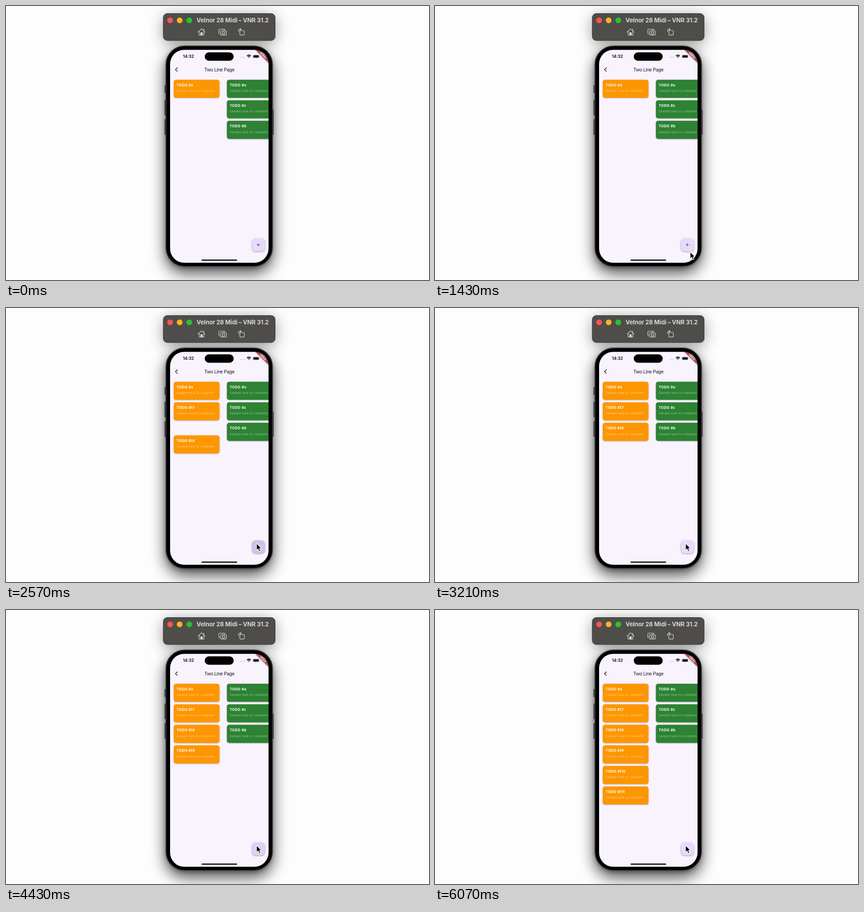
Write an HTML page that moves like this. It is 928x603 px and loops after 6.14 s.

```html
<!DOCTYPE html>
<html lang="en">
<head>
<meta charset="utf-8">
<title>Two Line Page</title>
<style>
html, body { margin: 0; width: 100%; height: 100%; overflow: hidden; background: #fdfdfd; }
svg { display: block; width: 928px; height: 603px; font-family: Inter, sans-serif; }
.wide { filter: blur(17px); opacity: .68; }
.tight { filter: blur(5px); opacity: .26; }
.raised { filter: drop-shadow(0 1px 1px rgba(0, 0, 0, .28)); }
.fab { filter: drop-shadow(0 1.5px 1.8px rgba(0, 0, 0, .38)); }
.line { fill: none; stroke: #dededc; stroke-width: 1.15; stroke-linejoin: round; stroke-linecap: round; }
.name { font-size: 7.7px; font-weight: 700; letter-spacing: .4px; fill: #fff; }
.note { font-size: 6.6px; letter-spacing: .3px; fill: #fff; fill-opacity: .52; }
</style>
</head>
<body>
<svg viewBox="0 0 928 603">
  <defs>
    <clipPath id="screen"><rect x="360" y="96.5" width="216" height="468.5" rx="31"/></clipPath>
  </defs>

  <!-- window shadows -->
  <rect class="wide" x="350" y="101" width="235" height="487" rx="42"/>
  <rect class="tight" x="350" y="90" width="235" height="487" rx="42"/>
  <rect class="wide" x="347" y="24" width="242" height="58" rx="9" style="opacity:.45"/>

  <!-- toolbar -->
  <rect x="345" y="16.5" width="245.5" height="59.5" rx="9" fill="#4e4d4a" stroke="#353533"/>
  <circle cx="360" cy="31.5" r="6.3" fill="#ff5450"/>
  <circle cx="381" cy="31.5" r="6.3" fill="#fdb124"/>
  <circle cx="402" cy="31.5" r="6.3" fill="#28c231"/>
  <text x="418" y="36" font-size="13" font-weight="700" letter-spacing="-.15" fill="#d6d6d4">Velnor 28 Midi – VNR 31.2</text>
  <g class="line">
    <path d="M421.5 57.5 429 50.2 436.5 57.5M423.7 56V64H434.3V56M433.7 54.2V50.8"/>
    <path d="M427.2 64V58.5H430.8V64Z" fill="#dededc"/>
    <path d="M468.8 61H468.4Q467 61 467 59.6V52.4Q467 51 468.4 51H479Q480.4 51 480.4 52.4"/>
    <path d="M472 54.7H474.2L475.4 53.2H479.2L480.4 54.7H482.2Q483.5 54.7 483.5 56V62.6Q483.5 63.9 482.2 63.9H472Q470.7 63.9 470.7 62.6V56Q470.7 54.7 472 54.7Z"/>
    <circle cx="477.2" cy="59.1" r="2.8"/>
    <rect x="513" y="54" width="9.8" height="9.8" rx="1.4"/>
    <path d="M510.3 56.5V53.8Q510.3 51.4 512.7 51.4H515.6M513.9 49.4 516 51.4 513.9 53.4"/>
  </g>

  <!-- phone -->
  <g fill="#38383d">
    <rect x="347.8" y="174" width="4" height="17.5" rx="1"/>
    <rect x="347.8" y="206" width="4" height="34.5" rx="1"/>
    <rect x="347.8" y="249" width="4" height="34.5" rx="1"/>
    <rect x="583.5" y="228" width="3.6" height="55.5" rx="1"/>
  </g>
  <rect x="351" y="88" width="233.5" height="485" rx="41" stroke="#39393c" stroke-width="2"/>
  <g clip-path="url(#screen)">
    <rect x="360" y="96" width="216" height="470" fill="#f9f3fe"/>
    <text x="388.3" y="114.3" font-size="9" font-weight="600">14:32</text>
    <rect x="436" y="102" width="63.5" height="18.5" rx="9.25"/>
    <g fill="#bcb8c0">
      <circle cx="514.7" cy="113.2" r=".9"/><circle cx="517.7" cy="113.2" r=".9"/>
      <circle cx="520.7" cy="113.2" r=".9"/><circle cx="523.7" cy="113.2" r=".9"/>
    </g>
    <g fill="none" stroke="#000" stroke-width="1.5">
      <path d="M528.3 109.8Q532.8 106 537.3 109.8M530 111.7Q532.8 109.4 535.6 111.7"/>
      <path d="M531.3 112.7H534.3L532.8 114.4Z" fill="#000" stroke="none"/>
      <path d="M376.3 135.8 371.8 140.1 376.3 144.4" stroke-width="1.3"/>
    </g>
    <rect x="541.8" y="107.7" width="13.6" height="6.6" rx="2" fill="none" stroke="#999" stroke-width=".6"/>
    <rect x="542.7" y="108.5" width="11.8" height="5" rx="1.2"/>
    <text x="468" y="144" text-anchor="middle" font-size="10.4" letter-spacing="-.45" fill="#1d1b20">Two Line Page</text>
    <g id="cards"></g>
    <rect x="429" y="557.9" width="78" height="2.5" rx="1.25"/>
    <g class="fab"><rect id="fab" x="539.6" y="511.6" width="28.4" height="28.4" rx="8"/></g>
    <path d="M550 525.5H557M553.5 522V529" stroke="#4a3970"/>
    <g transform="translate(576 96.5) rotate(45)">
      <rect x="-22" y="14" width="44" height="6.2" fill="#b0464a" class="raised"/>
      <text y="18.9" text-anchor="middle" font-size="4.9" font-weight="800" fill="#fff">DEBUG</text>
    </g>
  </g>
  <path id="cursor" d="M0 0V15L3.4 11.8 5.7 17.4 8.4 16.3 6.1 10.8H10.7Z" stroke="#fff" stroke-width="1.1" stroke-linejoin="round"/>
</svg>
<script>
const LOOP = 6140, ROW = 45.2;
const presses = [1800, 2480, 3480, 4395, 5155];
const $ = id => document.getElementById(id);
const clamp = v => Math.max(0, Math.min(1, v));
const easeOut = v => 1 - (1 - clamp(v)) ** 3;

const card = (x, row, label, color, added = '') => `
  <g transform="translate(${x} ${162.2 + row * ROW})"${added}>
    <rect class="raised" width="100.4" height="39.9" rx="5" fill="${color}"/>
    <text class="name" x="6.2" y="14.6">TODO #${label}</text>
    <text class="note" x="6.2" y="27.1">Sample task to complete</text>
  </g>`;
const orange = '#fd9600', green = '#2d8233';
$('cards').innerHTML = card(368, 0, 'a', orange) +
  ['u', 'c', 'b'].map((s, i) => card(484.6, i, s, green)).join('') +
  presses.map((_, i) => card(368, i + 1, 't' + (i + 7), orange, ' class="added"')).join('');
const added = document.querySelectorAll('.added');

// Ink darkens quickly on a press, then fades
const ink = age => age < 0 ? 0 : clamp(age / 90) * clamp((560 - age) / 360);

function draw(t) {
  let press = 0;
  presses.forEach((start, i) => {
    const age = t - start, slide = easeOut((age - 53) / 250);
    added[i].style.display = age < 53 ? 'none' : '';
    added[i].setAttribute('transform', `translate(368 ${162.2 + (i + 2 - slide) * ROW})`);
    press = Math.max(press, ink(age));
  });
  const shade = [230, 219, 251].map((c, k) => c - press * [24, 24, 18][k]);
  $('fab').setAttribute('fill', `rgb(${shade})`);

  const p = clamp((t - 900) / 810), move = p * p * (3 - 2 * p);
  $('cursor').style.display = t < 900 ? 'none' : '';
  $('cursor').setAttribute('transform', `translate(${586.5 - 36.7 * move} ${602 - 83.8 * move})`);
}

const begin = performance.now();
function tick() {
  draw((performance.now() - begin) % LOOP);
  requestAnimationFrame(tick);
}
tick();
</script>
</body>
</html>
```
